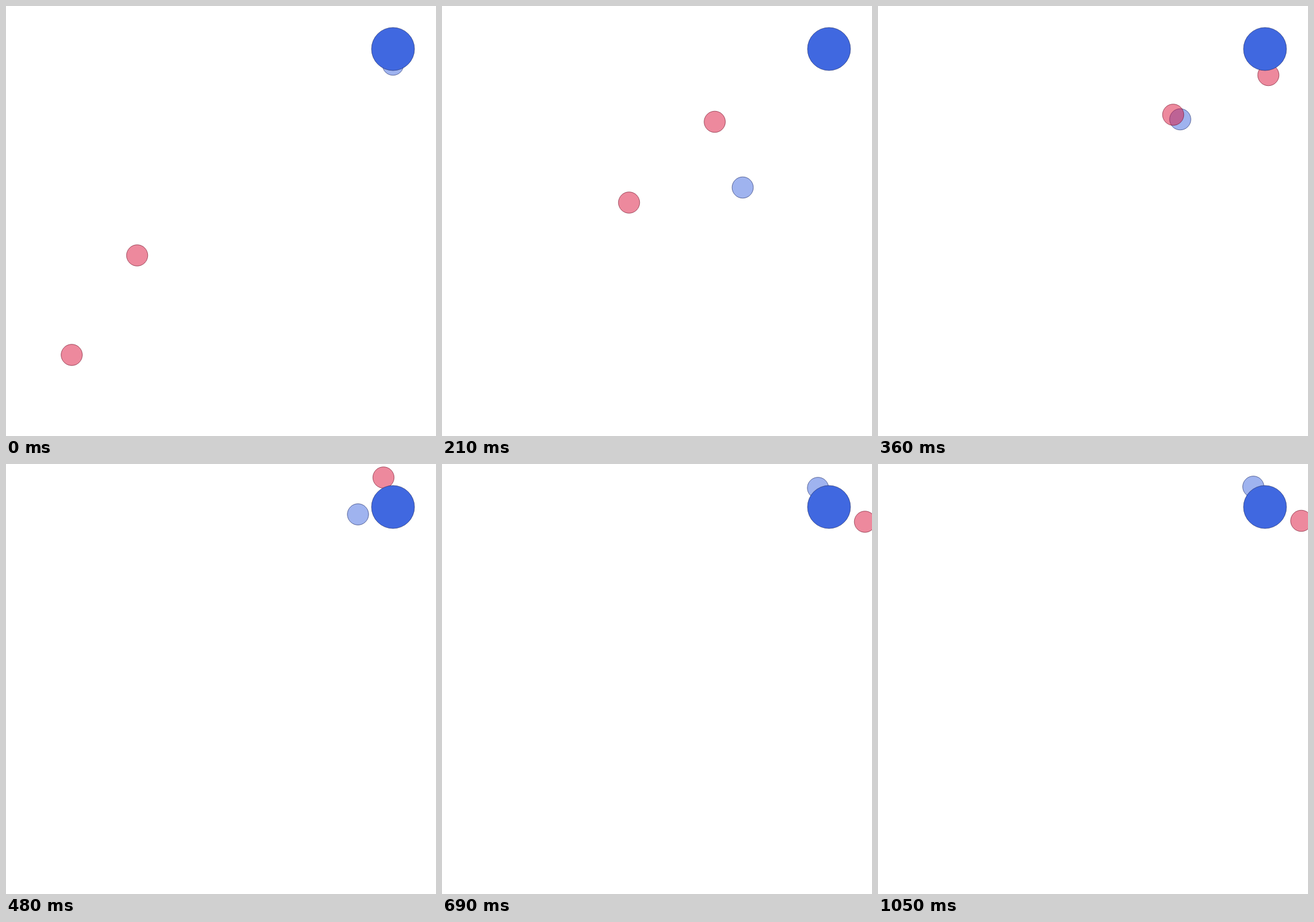
An HTML page that plays this animation: 700 px wide and 700 px high, repeating every 1080 ms.

```html
<!DOCTYPE html>
<html lang="en">
<head>
<meta charset="utf-8">
<title>Agents and landmark</title>
<style>
  html, body { margin: 0; width: 100%; height: 100%; overflow: hidden; background: #fff; }
  svg { display: block; width: 100%; height: 100%; }
  circle { stroke-width: 1; }
  .agent { fill-opacity: .5; }
  .red { fill: #dc143c; stroke: rgba(110, 5, 30, .6); }
  .blue { fill: #4068e0; stroke: rgba(20, 35, 100, .6); }
</style>
</head>
<body>
<svg viewBox="0 0 700 700">
  <circle class="agent blue" id="runner" r="17.3"/>
  <circle class="agent red" id="lead" r="17.3"/>
  <circle class="agent red" id="tail" r="17.3"/>
  <circle class="blue" cx="630" cy="70" r="35"/>
</svg>
<script>
const LOOP = 1080, STEP = 30;

// Key points: time in ms, x, y; an agent rests after its last one
const paths = {
  // swings out to meet the others, turns back and settles
  runner: [
    [0, 630, 95.5], [120, 565, 226], [210, 489.5, 295.5], [270, 463, 281],
    [360, 492, 184.5], [480, 573, 82], [600, 608, 44], [1050, 611, 37]
  ],
  // rounds the landmark and hides behind it
  lead: [
    [0, 213.5, 406], [210, 444, 188.5], [360, 635.5, 112.5],
    [420, 674, 60], [480, 614.5, 22], [600, 630, 70]
  ],
  // passes behind the landmark and comes to rest beside it
  tail: [
    [0, 107, 568], [210, 304.5, 320], [360, 480.5, 177], [480, 630, 70],
    [540, 675, 23], [630, 700, 108], [690, 688.5, 94], [1050, 689, 92.5]
  ]
};

// Slope of coordinate k at key point i
function slope(path, i, k) {
  const a = path[Math.max(i - 1, 0)];
  const b = path[Math.min(i + 1, path.length - 1)];
  return (b[k] - a[k]) / (b[0] - a[0]);
}

// Cubic Hermite curve through the key points
function at(path, t, k) {
  let i = 0;
  while (i < path.length - 2 && t >= path[i + 1][0]) i++;
  const a = path[i], b = path[i + 1], span = b[0] - a[0];
  const u = Math.min((t - a[0]) / span, 1), v = 1 - u;
  return a[k] * (1 + 2 * u) * v * v + b[k] * u * u * (3 - 2 * u)
    + span * u * v * (slope(path, i, k) * v - slope(path, i + 1, k) * u);
}

const start = performance.now();

function draw(now) {
  const t = Math.floor(Math.max(now - start, 0) % LOOP / STEP) * STEP;
  for (const id in paths) {
    const agent = document.getElementById(id);
    agent.setAttribute("cx", at(paths[id], t, 1));
    agent.setAttribute("cy", at(paths[id], t, 2));
  }
  requestAnimationFrame(draw);
}
draw(start);
</script>
</body>
</html>
```
